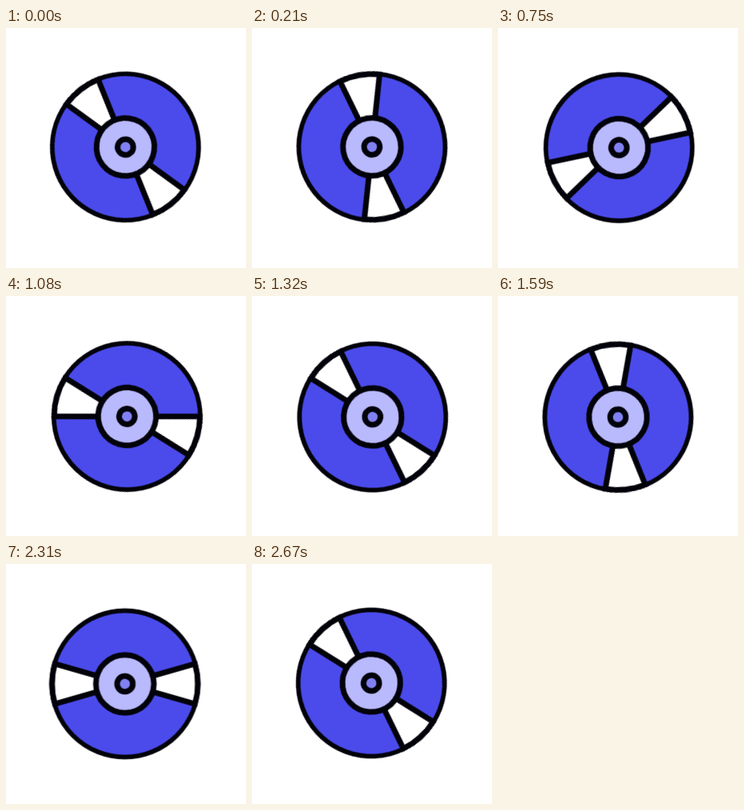
An HTML page for the animation above (2700 ms loop, 300 by 300 pixels).

```html
<!DOCTYPE html>
<html lang="en">
<head>
<meta charset="utf-8">
<title>Spinning disc</title>
<style>
  html, body { margin: 0; width: 100%; height: 100%; overflow: hidden; background: #fff; }
  svg { display: block; width: 100vw; height: 100vh; }
  .disc {
    transform-origin: 150px 150px;
    animation: spin 2700ms steps(90) infinite;
  }
  @keyframes spin {
    from { transform: rotate(0deg); }
    to { transform: rotate(360deg); }
  }
  .ink { stroke: #02020a; stroke-width: 7; }
  .blue { fill: #4b4bec; }
  .white { fill: #fff; }
  .hub { fill: #b9b9fd; }
  .hole { fill: #8080f2; }
  .rim { fill: none; stroke-width: 5.8; }
</style>
</head>
<body>
<svg viewBox="0 0 300 300">
  <defs>
    <path id="wedge" d="M0 0L-25.1 -87.5A91 91 0 0 1 25.1 -87.5Z"/>
  </defs>
  <g class="disc">
    <!-- the disc sits slightly off the pivot, so it wobbles as it turns -->
    <g class="ink" transform="translate(149.3 148.8) rotate(-38)">
      <circle class="blue" r="91" stroke="none"/>
      <use class="white" href="#wedge"/>
      <use class="white" href="#wedge" transform="rotate(180)"/>
      <circle class="rim" r="91.5"/>
      <circle class="hub" r="36.2"/>
      <circle class="hole" r="9.8"/>
    </g>
  </g>
</svg>
</body>
</html>
```
